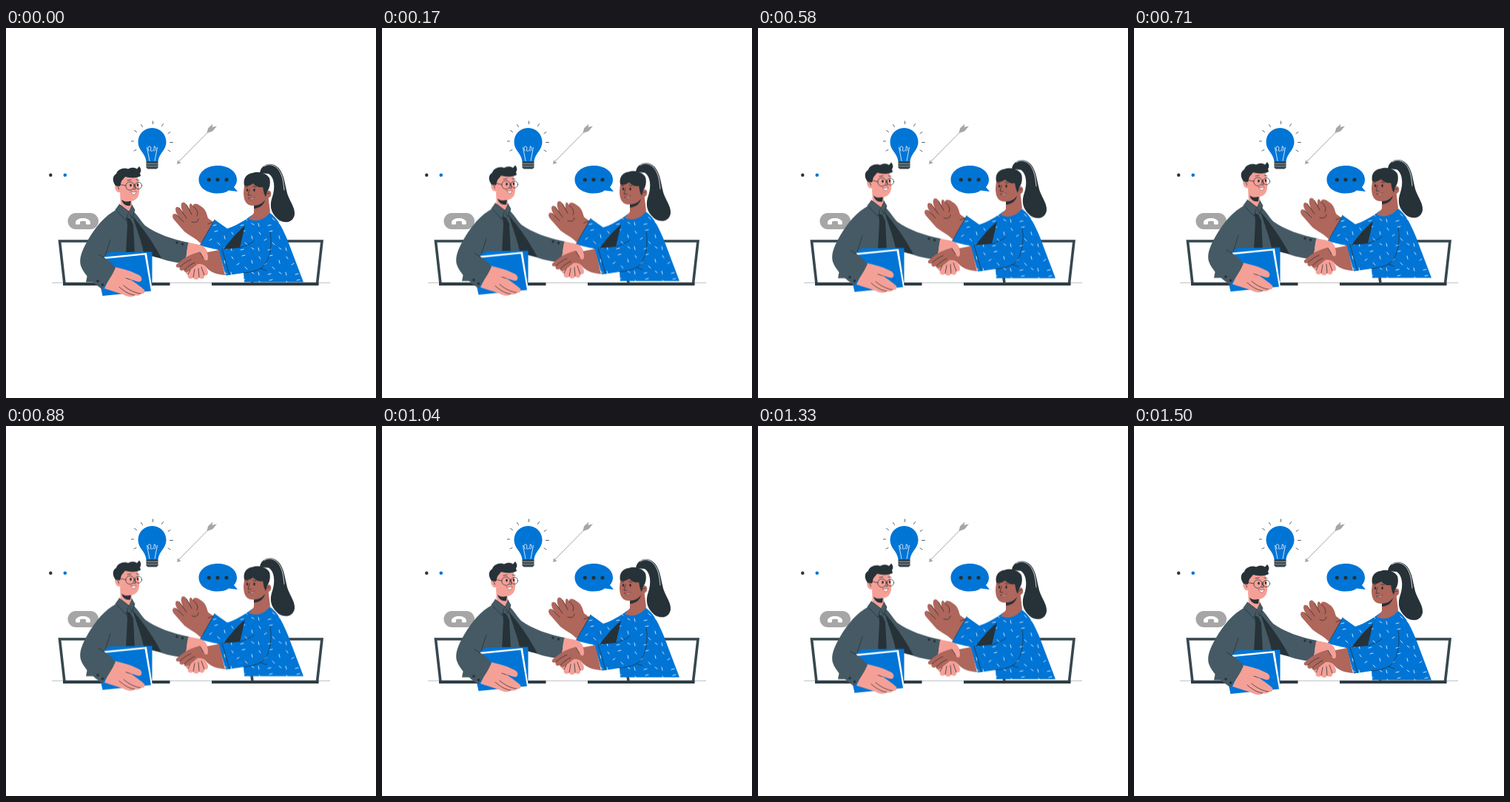
An HTML page without scripts that plays this animation: 500x500 px, repeating every 1.54 s.

```html
<!DOCTYPE html>
<html lang="en">
<head>
<meta charset="utf-8">
<title>Handshake</title>
<style>
  html, body { margin: 0; width: 100%; height: 100%; overflow: hidden; background: #fff; }
  svg { display: block; width: 100%; height: 100%; }
  .dark { fill: #263238; }
  .suit { fill: #455a64; }
  .blue { fill: #0075d6; }
  .pink { fill: #f5a097; }
  .brown { fill: #af665b; }
  .grey { fill: #a6a6a6; }
  .white { fill: #fff; }
  .line { fill: none; stroke: #263238; stroke-width: .75; stroke-linecap: round; stroke-linejoin: round; }
  .light { fill: none; stroke: #fff; stroke-width: .8; stroke-linecap: round; }
  .frame { fill: #fff; stroke: #37474f; stroke-width: 3.6; }
  .people { animation: bob 1540ms linear infinite; }
  @keyframes bob {
    0%, 97.5%, 100% { transform: translateY(0); }
    11% { transform: translateY(-1.5px); }
    24.7% { transform: translateY(-3.5px); }
    37.7% { transform: translateY(-5.4px); }
    47% { transform: translateY(-5.9px); }
    57.2% { transform: translateY(-5.4px); }
    78.6% { transform: translateY(-2.3px); }
  }
</style>
</head>
<body>
<svg viewBox="0 0 500 500">
  <defs>
    <pattern id="dashes" width="37" height="33" patternUnits="userSpaceOnUse" patternTransform="translate(5 8)">
      <rect class="blue" width="37" height="33"/>
      <path class="light" d="M4 4l2 3M18 3l4-1M31 9l1 4M11 15l3-2M22 18l3 3M3 25l1 4M16 28l4-1M31 25l3 2"/>
    </pattern>
  </defs>
  <rect class="white" width="500" height="500"/>

  <!-- desk and screens -->
  <path d="M62 344.300H438" stroke="#b5b9bb" stroke-width=".9"/>
  <path class="frame" d="M72.500 288H174L168 345.500H79ZM427 288H326L333 345.500H420.500Z"/>
  <path d="M77 346H221.500M278 346H422.500" stroke="#2f3d44" stroke-width="3.800"/>

  <!-- floating icons -->
  <circle class="dark" cx="60.300" cy="198.700" r="2.200"/>
  <circle class="blue" cx="79.800" cy="198.700" r="2.300"/>
  <g>
    <path class="line" d="M198.500 126v3.500M182.500 130.500l2 3M212.500 129.500l-2 3M173.500 138.500l3 2M222 140.500l-3 2M169.500 153h3M221.500 154.500h4M173 166l3-1.500M219 165l3 2"/>
    <path class="blue" d="M197.500 135C208 135 216.500 143.500 216.500 154C216.500 165 207 169 205.500 180H189.500C188 169 178.500 165 178.500 154C178.500 143.500 187 135 197.500 135Z"/>
    <path class="light" d="M194 179.500L190.500 161.500M201 179.500L204.500 161.500M193 166C190 161 194 158 195.500 161S193 167 197.500 166S199 158 201 160S203 166 200 166"/>
    <path fill="#37474f" d="M189.500 180H205.500V188.500L203.500 190.500H191.500L189.500 188.500Z"/>
    <path d="M190 183.500H205M190 186.800H205" stroke="#aeb6ba" stroke-width=".7"/>
  </g>
  <g class="grey">
    <path d="M232.500 181.500L273.500 140" stroke="#a6a6a6" stroke-width="1"/>
    <path d="M231 184L232 178.500L236.500 182.500ZM271.500 142L273 135.500L279.500 129.500L278.500 134L285 132.500L279 139.500Z"/>
  </g>
  <path class="blue" d="M286 186C301 186 312 194 312 205C312 210 309.500 213.500 308 215L313 221L301 219.500C297 222.500 291 223.500 286 223.500C271 223.500 260.500 215.500 260.500 205S271 186 286 186Z"/>
  <g class="dark"><circle cx="274.300" cy="205" r="2.600"/><circle cx="286" cy="205" r="2.600"/><circle cx="298" cy="205" r="2.600"/></g>
  <rect class="grey" x="83.500" y="250" width="41.500" height="22" rx="11"/>
  <path class="white" d="M94 262.500C95 255 113 255 114 262.500V264.500Q114 265.500 113 265.500H109Q108 265.500 108 264.500V261.500Q104 260 100 261.500V264.500Q100 265.500 99 265.500H95Q94 265.500 94 264.500Z"/>

  <g class="people">
    <!-- man: body and head -->
    <path class="suit" d="M153 240L170 246C178 252 182 261 188 267C203 278 226 286 247 290L242 318C225 317 209 313 197 306V343.500H108L113 318L133 264Z"/>
    <path class="dark" d="M171 254C179 264 194 281 210 311C201 310 193 307 186 303C183 288 176 270 171 254ZM163 256L168 258L172 266L174 306H162L164 267Z"/>
    <path class="pink" d="M154 222L155 242L167 251L171 242L169 231Z"/>
    <path class="dark" d="M156 232C160 235 165 235.500 169 233L168 240C162 241 158 238 156 232Z"/>
    <path class="suit" d="M153 238L166 248L162 260L148 245ZM170 239L174 246L170 257L166 248Z"/>
    <path class="line" d="M153 238L166 248L162 260L148 245M170 239L174 246L170 257L166 248"/>
    <path class="pink" d="M151 211C148 209 146 213 148 218C149 222 153 223 155 222C157 230 162 234.500 169 234C177 233 181 227 180 216L178 201L155 199Z"/>
    <path class="dark" d="M148 213C143 206 144 200 149 197C151 191 159 188 165 190.500C169 188 174 188 177 190.500L180 187C183 190 183 194 181 196L182 200C177 203 168 203 161 201L156 207L154 214Z"/>
    <g class="line">
      <circle cx="167.500" cy="213.500" r="5.700"/><circle cx="179" cy="213" r="4.600"/>
      <path d="M154 211.500L162 213M164 206l5-1M176 205l4 1M173.500 211L175 218L172 218M149.500 213q3 1 3 5"/>
    </g>
    <ellipse class="dark" cx="168.500" cy="212.500" rx="1.300" ry="2"/>
    <ellipse class="dark" cx="178" cy="212" rx="1.200" ry="1.900"/>
    <path d="M168 221Q173 223 176 220.500Q175 226 171.500 225Z" fill="#fff" stroke="#8e3f3c" stroke-width=".6"/>

    <!-- folder -->
    <path class="blue" d="M133 307L141 303L197.500 302.500V349L137 350Z"/>
    <path class="white" d="M133 309.500L190 304L197.800 354.500L135 360Z"/>
    <path class="blue" d="M133.500 312L187.500 306.500L196 355.500L130.500 362L127 346Z"/>

    <!-- man: arm around folder -->
    <path class="pink" d="M147 323C156 325 163 327 169 329L180 334C185 337 184 343 180 343C176 343 172 340 168 340C176 345 183 350 187 354C189 358 185 360 182 359C181 362 176 362 174 361C171 365 163 363 158 360C150 357 141 355 133 352Z"/>
    <path class="line" d="M168 340L162 338M159 348C166 354 174 358 182 359M153 350C161 357 167 360 174 361"/>
    <path class="suit" d="M150 245C133 254 121 269 111 286C104 298 98 311 101 321C105 333 117 344 130 353C136 345 143 336 148 324C143 318 138 313 132 310C137 298 143 284 147 270Z"/>
    <path class="line" d="M132 310L125 306M134 308L141 286"/>
    <circle class="dark" cx="124" cy="342" r="1.800"/><circle class="dark" cx="130.500" cy="347" r="1.800"/>
    <circle class="dark" cx="231" cy="290" r="1.700"/><circle class="dark" cx="238.500" cy="292" r="1.700"/>

    <!-- woman: raised hand -->
    <path class="brown" d="M263 291C255 283 247 280 241 275L227 259C223 254 226 249 230 252L234 256C226 246 229 239 234 243L239 249C233 236 240 232 244 239L248 245C247 236 250 235 253 241C252 236 259 237 262 240C270 244 271 251 273 257L284 265Z"/>
    <path class="line" d="M230 252L240 262M234 243L244 257M244 239L251 252M253 241C259 246 260 250 258 254M251 262C257 264 260 261 260 258"/>

    <!-- woman: torso -->
    <path fill="url(#dashes)" d="M282 259L299 271C311 267 321 261 332 253L357 250C367 257 374 271 381 288L402 343.500H322L321 331L297 334.500L287 300L262 294Z"/>
    <path class="dark" d="M323 267C313 275 303 287 294 299L316 297Z"/>
    <path class="line" d="M282 259L262 294M273 265L280 262M316 297C324 294 330 292 335 288M357 276C360 294 357 313 347 323C340 328 330 330 321 331M344 325L352 328"/>
    <path class="line" d="M292 299L302 333.500"/>

    <!-- woman: head -->
    <path class="dark" d="M343 196C344 187 353 182 361 184.500C374 189 376 205 379 219C381 232 391 241 390 252C388 264 375 265 367 258C357 249 356 239 360 228C364 216 363 202 355 197Z"/>
    <path class="light" d="M349 187C357 181 367 187 371 196C375 204 375 212 376 219"/>
    <path class="brown" d="M335 232L335 250L328 258C338 263 350 259 357 249L354 224Z"/>
    <path class="dark" d="M335 238C341 240 346 237 350 232C349 239 342 244 335 244Z"/>
    <path class="brown" d="M323 204L321 222C321 234 325 240 334 240C343 240 349 235 351 230C357 231 359 226 358 222C357 219 354 219 352 220L351 204L337 198Z"/>
    <path class="dark" d="M322 213C320 203 325 197 333 196C341 193 352 196 356 203C358 210 356 217 353 221L351 228C348 224 348 218 347 215C342 216 337 214 334 210C330 213 326 214 322 213Z"/>
    <path class="line" d="M324 215l3-1M334 214l4 1M329 218L327 226L331 226M353 224l3-1"/>
    <ellipse class="dark" cx="326" cy="219" rx="1.200" ry="1.900"/>
    <ellipse class="dark" cx="335.500" cy="219" rx="1.300" ry="2"/>
    <path d="M327 229.500Q332 232 336 228Q335 232 331 232Z" fill="#fff" stroke="#632f2b" stroke-width=".7"/>

    <!-- handshake -->
    <path class="pink" d="M247 290L261 293C268 294 271 299 273 305L273 315C263 317 253 320 247 322C240 328 243 334 246 333C244 338 250 341 253 337C254 341 260 341 261 337C265 341 269 338 268 334C274 336 274 329 271 325L264 315L243 311Z"/>
    <path class="brown" d="M288 300L272 303C263 301 257 304 251 306C243 309 237 314 231 319C228 322 231 325 235 323C233 327 237 329 241 327C240 331 245 331 249 327L259 319C264 319 267 319 270 323C276 330 284 333 296 334Z"/>
    <path class="pink" d="M246 291L261 293C268 295 273 302 273 310C273 316 269 315 267 311L262 303C255 300 249 301 244 303Z"/>
    <path class="line" d="M235 323C240 318 245 315 250 313M241 327C246 322 250 319 255 317M246 333L249 327M253 337L255 326M261 337L260 325M268 334L264 323M262 303L267 311"/>
  </g>
</svg>
</body>
</html>
```
